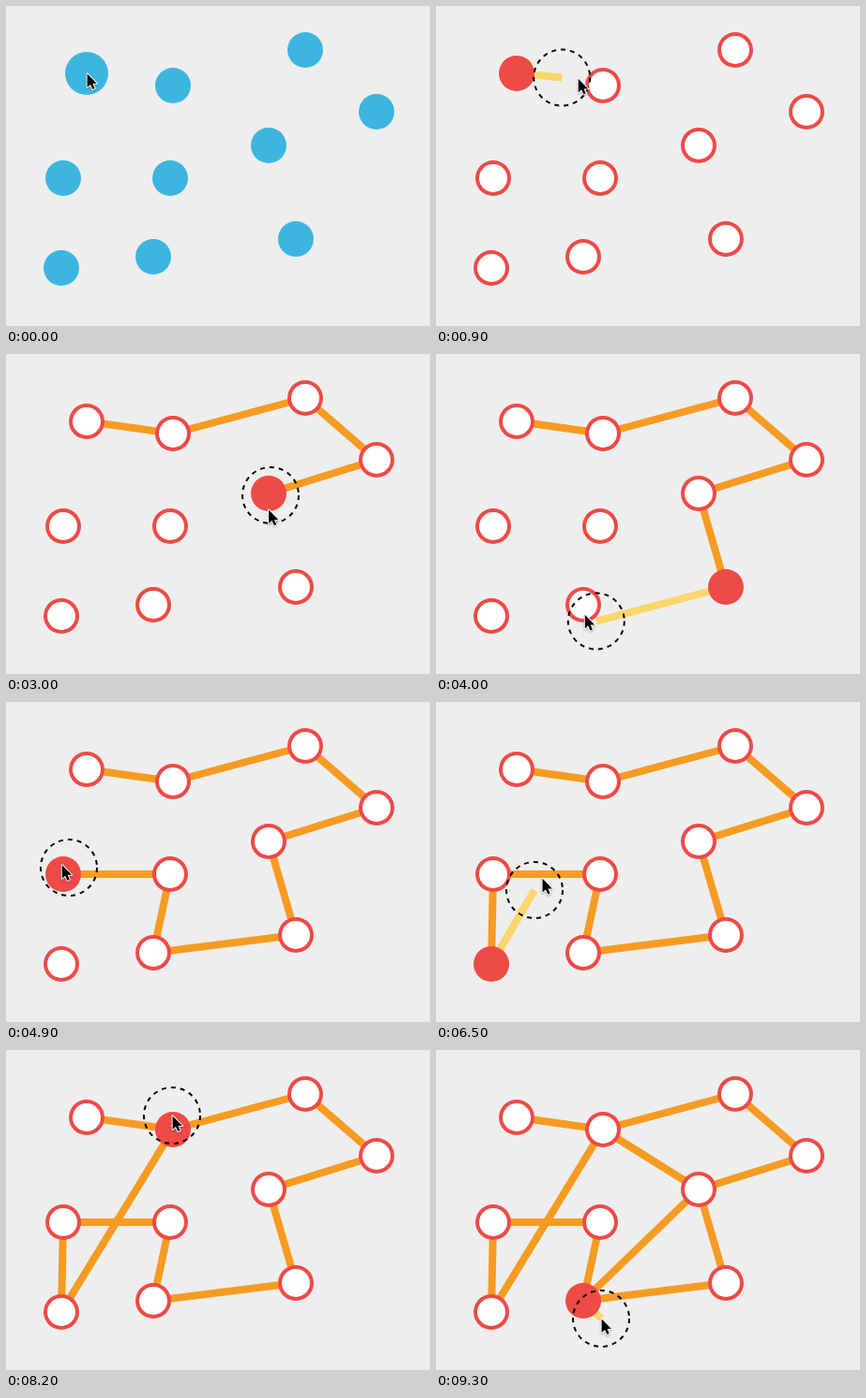
Recreate the animation shown at these times as an HTML page with a canvas. Size 452x342 px, loop 9400 ms.

```html
<!DOCTYPE html>
<html lang="en">
<head>
<meta charset="utf-8">
<title>Connecting nodes</title>
<style>
html, body { margin: 0; width: 100%; height: 100%; overflow: hidden; background: #eee; }
canvas { display: block; width: 452px; height: 342px; }
</style>
</head>
<body>
<canvas width="452" height="342"></canvas>
<script>
const LOOP = 9400, STEP = 100, PRESS = 300, LEAD = 90;
const BLUE = [60, 182, 223], RED = [238, 74, 70], WHITE = [255, 255, 255];
const ORANGE = '#f59b22', YELLOW = '#fcd56c';

const nodes = {
  A: [86, 72], B: [178, 85], C: [319, 47], D: [395, 113], E: [280, 149],
  F: [309, 249], G: [157, 268], H: [175, 184], I: [61, 184], J: [59, 280]
};
const route = [...'ABCDEFGHIJBEG'].map(k => nodes[k]);

// Pointer stops: time, nearby node, offset from it
const stop = (t, key, dx = 0, dy = 0) => ({ t, p: [nodes[key][0] + dx, nodes[key][1] + dy] });
const stops = [
  stop(0, 'A'), stop(500, 'A'), stop(1150, 'B', 0, -8),
  stop(1900, 'C', -34, 7), stop(2150, 'C', 0, -10), stop(2450, 'D', 24, -10),
  stop(3000, 'E', 2, 2), stop(3500, 'F'), stop(4050, 'G', 5, 15), stop(4450, 'H'),
  stop(4900, 'I', 6, -7), stop(5000, 'I', -2, -9), stop(5600, 'J'), stop(5900, 'J'),
  stop(6500, 'B', -73, 116), stop(7300, 'B', -3, 8), stop(8200, 'B', -1, -15),
  stop(8300, 'B', -1, -15), stop(8600, 'E'), stop(9000, 'G', 1, 6),
  stop(9300, 'G', 19, 19), stop(LOOP, 'G', 19, 19)
];

const same = (a, b) => a.p[0] === b.p[0] && a.p[1] === b.p[1];

// Velocity through a stop; zero where the pointer rests
function slope(i, c) {
  const a = stops[i - 1], s = stops[i], b = stops[i + 1];
  if (!a || !b || same(a, s) || same(s, b)) return 0;
  return (b.p[c] - a.p[c]) / (b.t - a.t);
}

function pointAt(t) {
  const i = stops.findIndex((s, j) => j > 0 && t <= s.t) - 1;
  const a = stops[i], b = stops[i + 1], d = b.t - a.t;
  const u = (t - a.t) / d, v = 1 - u, ease = u * u * (3 - 2 * u);
  return [0, 1].map(c =>
    a.p[c] + (b.p[c] - a.p[c]) * ease + d * u * v * (slope(i, c) * v - slope(i + 1, c) * u));
}

// Number of links made by each step
const links = [];
for (let t = 0, n = 0; t < LOOP; t += STEP) {
  const [x, y] = pointAt(t), next = route[n + 1];
  if (next && Math.hypot(x - next[0], y - next[1]) < 19) n++;
  links.push(n);
}

const g = document.querySelector('canvas').getContext('2d');
const arrow = new Path2D('M0 0V14.6L3.4 11.5 5.7 16.7 8.1 15.6 5.9 10.6H10.4Z');
const mix = (a, b, k) => `rgb(${a.map((v, i) => Math.round(v + (b[i] - v) * k))})`;

function line(points, color) {
  g.beginPath();
  points.forEach(p => g.lineTo(...p));
  g.strokeStyle = color;
  g.lineWidth = 8;
  g.stroke();
}

function disc([x, y], r, color) {
  g.beginPath();
  g.arc(x, y, r, 0, 2 * Math.PI);
  g.fillStyle = color;
  g.fill();
}

function ring([x, y]) {
  g.beginPath();
  g.arc(x, y, 30, 0, 2 * Math.PI);
  g.setLineDash([5, 5]);
  g.strokeStyle = '#000';
  g.lineWidth = 2;
  g.stroke();
  g.setLineDash([]);
}

function cursor([x, y]) {
  g.save();
  g.translate(x + 0.6, y + 0.4);
  g.shadowColor = 'rgba(0,0,0,.3)';
  g.shadowBlur = 2;
  g.shadowOffsetY = 1;
  g.strokeStyle = '#fff';
  g.lineWidth = 2;
  g.stroke(arrow);
  g.shadowColor = 'transparent';
  g.fillStyle = '#000';
  g.fill(arrow);
  g.restore();
}

function draw(t) {
  const n = links[t / STEP], active = route[n], pos = pointAt(t);
  const k = Math.max(0, Math.min(1, (t - PRESS + STEP) / 200));
  g.fillStyle = '#eee';
  g.fillRect(0, 0, 452, 342);
  g.lineJoin = 'round';

  line(route.slice(0, n + 1), ORANGE);
  if (t >= PRESS) line([active, pos], YELLOW);

  for (const p of Object.values(nodes)) {
    const on = p === active;
    disc(p, on ? 19 + 4 * (1 - k) : 19, mix(BLUE, RED, k));
    if (!on && k) disc(p, 15, mix(BLUE, WHITE, k));
  }

  if (t >= PRESS) ring(pos);
  cursor(pointAt(Math.min(t + LEAD, LOOP)));
}

const start = performance.now();
function tick() {
  const t = (performance.now() - start) % LOOP;
  draw(Math.floor(t / STEP) * STEP);
  requestAnimationFrame(tick);
}
tick();
</script>
</body>
</html>
```
